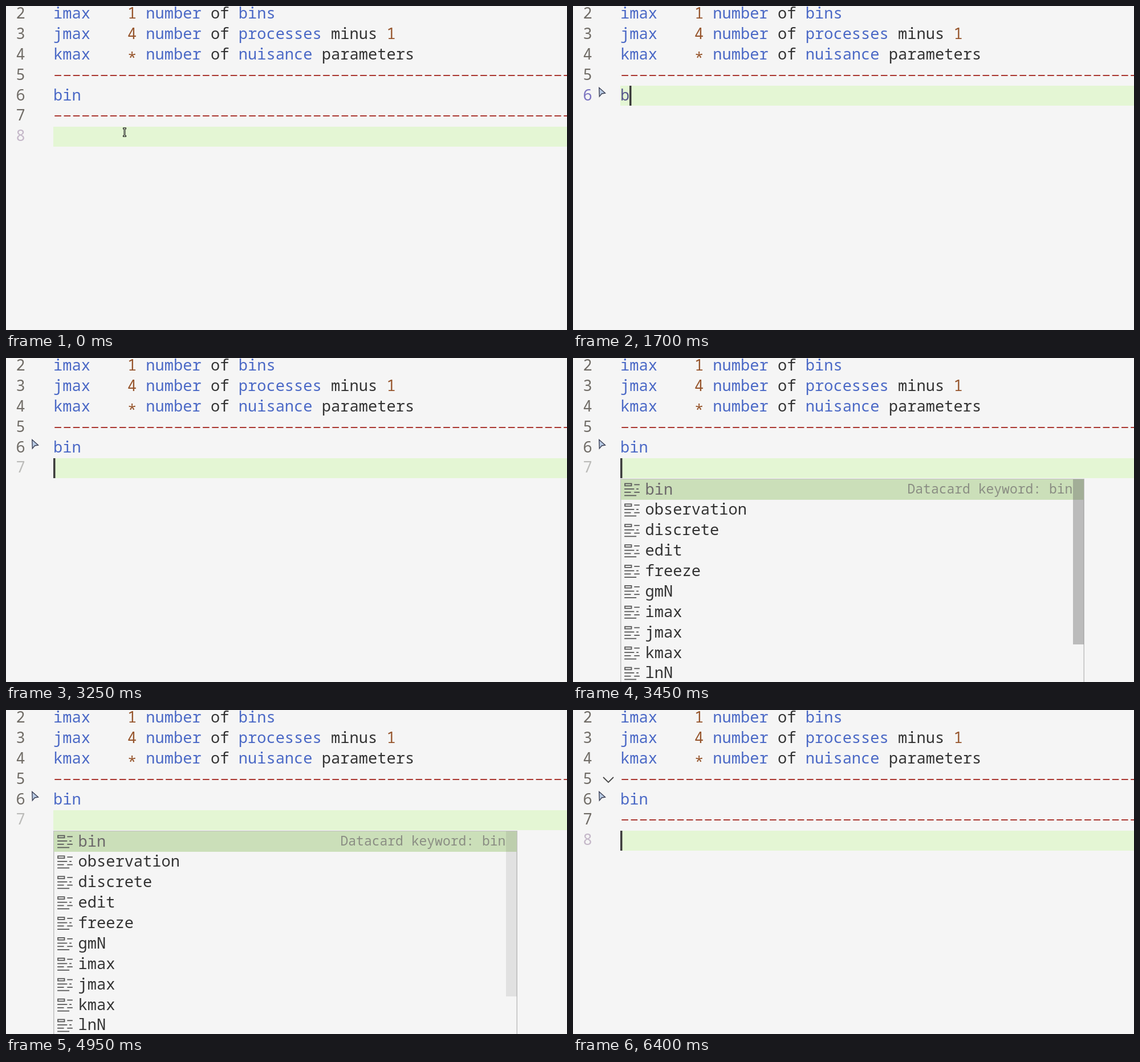
An HTML page with a canvas that plays this animation: 984 px wide and 569 px high, repeating every 6.55 s.

```html
<!DOCTYPE html>
<html lang="en">
<head>
<meta charset="utf-8">
<title>Editor completion</title>
<style>
  html, body { margin: 0; width: 100%; height: 100%; overflow: hidden; background: #f5f5f5; }
  canvas { display: block; }
</style>
</head>
<body>
<canvas id="stage" width="984" height="569"></canvas>
<script>
const ctx = document.getElementById('stage').getContext('2d');
const W = 984, H = 569, LOOP = 6550;
const LEFT = 83, FONT = 27.06, CHAR = FONT * 0.6, PITCH = 35.8;
const BLUE = '#4b69c6', BROWN = '#96552c', RED = '#aa3731', INK = '#333333', GUTTER = '#706c66';
const KEYWORDS = ['bin', 'observation', 'discrete', 'edit', 'freeze', 'gmN', 'imax', 'jmax', 'kmax', 'lnN'];

// Each run is [column, text, colour].
const HEADER = {
  2: [[0, 'imax', BLUE], [8, '1', BROWN], [10, 'number', BLUE], [17, 'of', INK], [20, 'bins', BLUE]],
  3: [[0, 'jmax', BLUE], [8, '4', BROWN], [10, 'number', BLUE], [17, 'of', INK],
      [20, 'processes', BLUE], [30, 'minus', INK], [36, '1', BROWN]],
  4: [[0, 'kmax', BLUE], [10, 'number', BLUE], [17, 'of', INK],
      [20, 'nuisance', BLUE], [29, 'parameters', INK]]
};

const baseline = line => Math.floor(22.85 + (line - 2) * PITCH);
const rowTop = line => Math.round(140 + (line - 6) * 35.9);
const between = (t, from, to) => t >= from && t < to;

function rect(x, y, w, h, color) {
  ctx.fillStyle = color;
  ctx.fillRect(x, y, w, h);
}

function text(str, x, y, color, size = FONT) {
  ctx.font = `${size}px "Noto Sans Mono", monospace`;
  ctx.fillStyle = color;
  ctx.fillText(str, x, y);
}

function code(line, col, str, color) {
  text(str, LEFT + col * CHAR, baseline(line), color);
}

function lineNumber(line, color = GUTTER) {
  text(line, 17.5, baseline(line), color);
}

function dashes(line, count, color) {
  const y = baseline(line) - 9;
  for (let i = 0; i < count; i++) rect(LEFT + 2.3 + i * CHAR, y, 11.6, 2, color);
}

function divider(line) {
  dashes(line, 56, RED);
}

function highlight(line) {
  rect(LEFT, rowTop(line), W - LEFT, 35, '#e4f6d4');
}

function caret(line, col) {
  rect(Math.round(LEFT + col * CHAR + 0.2), rowTop(line), 3.5, 35, '#3b3b3b');
}

function path(points, close) {
  ctx.beginPath();
  points.forEach(([x, y]) => ctx.lineTo(x, y));
  if (close) ctx.closePath();
}

function arrowPointer() {
  path([[45.8, 143.5], [56.5, 153], [50.5, 154], [46.3, 159]], true);
  ctx.fillStyle = '#b9cbe4';
  ctx.fill();
  ctx.strokeStyle = '#3d4257';
  ctx.lineWidth = 1.4;
  ctx.stroke();
}

function textPointer() {
  const shape = (color, grow) => {
    rect(206 - grow, 214.5 - grow, 4 + 2 * grow, 1 + 2 * grow, color);
    rect(206 - grow, 228 - grow, 4 + 2 * grow, 1 + 2 * grow, color);
    rect(207.5 - grow, 214.5 - grow, 1 + 2 * grow, 14 + 2 * grow, color);
  };
  shape('#20251f', 1);
  shape('#d4dccb', 0);
}

function chevron() {
  path([[53, 118], [62, 127], [71, 118]]);
  ctx.strokeStyle = '#484848';
  ctx.lineWidth = 1.8;
  ctx.stroke();
}

function keywordIcon(x, y) {
  const s = 1.91, color = '#595959';
  const bar = (c, r, w) => rect(x + c * s, y + r * s, w * s, 1.8, color);
  ctx.strokeStyle = color;
  ctx.lineWidth = 1.8;
  ctx.strokeRect(x + 1.5 * s, y + 2.5 * s, 6 * s, 2 * s);
  bar(10, 3, 5);
  bar(1, 7, 9);
  bar(12, 7, 2);
  bar(1, 10, 6);
  bar(10, 10, 5);
  bar(1, 13, 11);
}

function snippetIcon(x, y) {
  path([[x, y + 21], [x, y], [x + 24, y], [x + 24, y + 21]]);
  ctx.strokeStyle = '#595959';
  ctx.lineWidth = 1.8;
  ctx.stroke();
  for (let i = 0; i < 7; i++) rect(x - 1 + i * 4, y + 23, 2, 2, '#595959');
}

function popup(x, withDivider, barOpacity) {
  const right = x + 814;
  rect(x, 212, 814, H - 212, '#bfbfbf');
  rect(x + 1.5, 213.5, 811, H - 213, '#f5f5f5');
  rect(x + 1, 213, 812, 36, '#cbdfb9');
  const labels = withDivider ? ['Complete divider (80 -…', ...KEYWORDS] : KEYWORDS;
  labels.slice(0, 10).forEach((label, i) => {
    const top = 213 + i * 35.88;
    if (withDivider && i === 0) snippetIcon(x + 10, top + 6.5);
    else keywordIcon(x + 5.2, top + 2.8);
    text(label, x + 43.5, Math.round(top + 26.5), i ? INK : '#6c686a');
  });
  const detail = withDivider ? 'Complete marker with 7…' : 'Datacard keyword: bin';
  text(detail, withDivider ? 569.5 : 586.5, 238, '#8a8d83', 23);
  rect(right - 20, 213, 19, 290, `rgba(100,100,100,${0.4 * barOpacity})`);
}

// Linear interpolation over [time, value] stops.
function ramp(t, stops) {
  if (t <= stops[0][0]) return stops[0][1];
  for (let i = 1; i < stops.length; i++) {
    const [a, u] = stops[i - 1], [b, v] = stops[i];
    if (t < b) return u + (v - u) * (t - a) / (b - a);
  }
  return stops[stops.length - 1][1];
}

function typedBin(t) {
  if (t < 1700) return '';
  if (t < 1800) return 'b';
  return t < 2050 ? 'bi' : 'bin';
}

function editLineSix(t) {
  const typed = typedBin(t);
  highlight(6);
  lineNumber(6, '#7a72bf');
  code(6, 0, typed, t < 1800 ? '#58588c' : INK);
  if (between(t, 300, 700) || between(t, 1250, 3100)) caret(6, typed.length);
}

function editLineSeven(t) {
  const dash = t >= 5450;
  highlight(7);
  lineNumber(6);
  code(6, 0, 'bin', BLUE);
  lineNumber(7, dash ? '#7a5fc0' : '#bbbbb9');
  if (t >= 5700) {
    divider(7);
    return;
  }
  if (dash) {
    dashes(7, 1, INK);
    popup(100, true, ramp(t, [[5450, 0.1], [5500, 0.33], [5600, 1]]));
  } else if (t >= 3350) {
    popup(LEFT, false, ramp(t, [[3350, 0.2], [3450, 1], [3850, 1], [4300, 0.48], [4750, 0.48], [5400, 0]]));
  }
  if (!between(t, 3850, 4300) && !between(t, 4800, 5300)) caret(7, dash ? 1 : 0);
}

function finished(t) {
  highlight(8);
  lineNumber(6);
  code(6, 0, 'bin', BLUE);
  lineNumber(7);
  divider(7);
  lineNumber(8, '#c4b7c8');
  if (t >= 6400) caret(8, 0);
}

function draw(t) {
  rect(0, 0, W, H, '#f5f5f5');
  for (const line of [2, 3, 4]) {
    lineNumber(line);
    HEADER[line].forEach(([col, str, color]) => code(line, col, str, color));
  }
  text('*', LEFT + 8 * CHAR, baseline(4) + 6.5, BROWN);
  lineNumber(5);
  divider(5);

  if (t < 100 || t >= 6400) finished(t);
  else if (t < 3250) editLineSix(t);
  else editLineSeven(t);

  if (t >= 5850) chevron();
  if (t < 100) textPointer();
  else arrowPointer();
}

const start = performance.now();
function tick() {
  const t = (performance.now() - start) % LOOP;
  draw(Math.floor(t / 50) * 50);
  requestAnimationFrame(tick);
}
tick();
</script>
</body>
</html>
```
